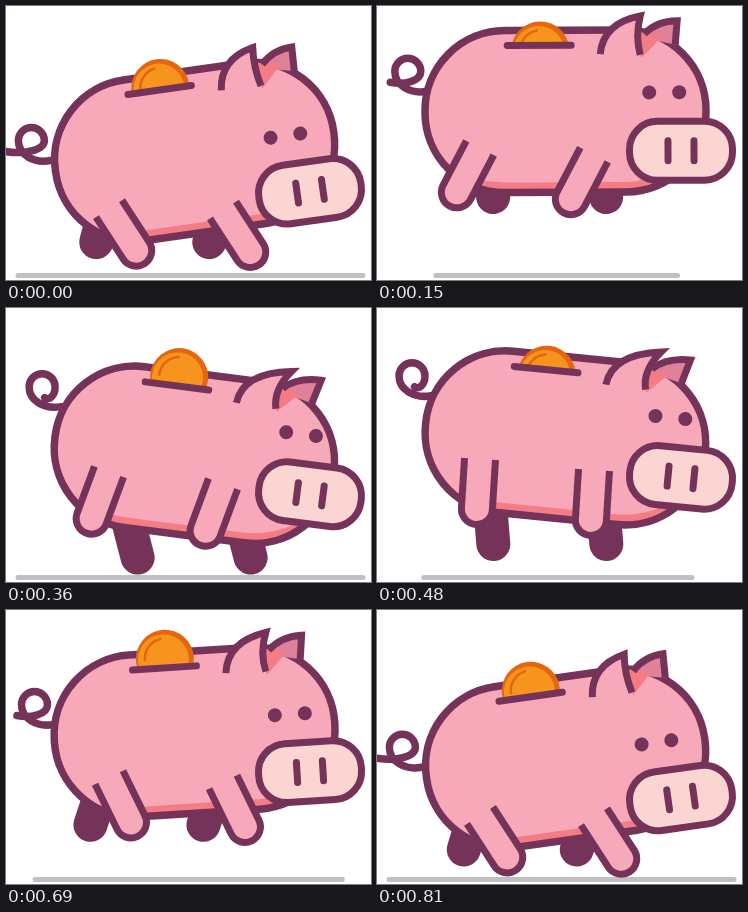
These frames come from a looping animation (365 by 274 pixels, 0.84 s). An HTML page with a canvas:

```html
<!DOCTYPE html>
<html lang="en">
<head>
<meta charset="utf-8">
<title>Running piggy bank</title>
<style>
  html, body { margin: 0; width: 100%; height: 100%; overflow: hidden; background: #fff; }
  canvas { display: block; }
</style>
</head>
<body>
<canvas id="stage" width="365" height="274"></canvas>
<script>
const ctx = document.getElementById('stage').getContext('2d');
const LOOP = 840, STEP = 30;
const PLUM = '#76335a', PINK = '#f7a8b9', SALMON = '#f47c84', ROSE = '#df8199', SNOUT = '#fbd5d1';
const ORANGE = '#f7941e', RUST = '#e5660f';
const { cos, sin, PI } = Math;

const smooth = u => {
  u = Math.min(1, Math.max(0, u));
  return u * u * (3 - 2 * u);
};

// Eases up to 1 at "top", holds until "hold", eases back to 0 at "end"
const pulse = (t, top, hold, end) => smooth(t / top) * smooth((end - t) / (end - hold));

// One gallop holds two bounces; the bounce runs at double angle
function pose(t) {
  const a = 2 * PI * t / LOOP;
  return {
    y: 125 + 22.5 * cos(2 * a + 0.5),
    tilt: -7.2 * cos(a + 0.26) - 1.1 * cos(3 * a),
    leg: -33 + 63 * pulse(t, 170, 210, 815),
    footX: 108 + 25 * cos(a - 2.36),
    footY: 96 + 9 * cos(a - 3.58) + 3.5 * cos(2 * a),
    ear: 79.5 + 7.5 * cos(a - 3.3),
    curl: -11 - 15 * cos(a),
    coin: -2 + 9 * sin(2 * a),
    shadow: 47 * pulse(t % (LOOP / 2), 90, 140, 360)
  };
}

function paint(path, fill, stroke, width = 7, cap = 'butt') {
  const shape = typeof path === 'string' ? new Path2D(path) : path;
  if (fill) { ctx.fillStyle = fill; ctx.fill(shape); }
  if (stroke) {
    ctx.strokeStyle = stroke;
    ctx.lineWidth = width;
    ctx.lineCap = cap;
    ctx.stroke(shape);
  }
}

function pill(x, y, w, h, r) {
  const p = new Path2D();
  p.roundRect(x, y, w, h, r);
  return p;
}

function dot(x, y, r) {
  const p = new Path2D();
  p.arc(x, y, r, 0, 2 * PI);
  return p;
}

function group(x, y, degrees, content) {
  ctx.save();
  ctx.translate(x, y);
  ctx.rotate(degrees * PI / 180);
  content();
  ctx.restore();
}

const bodyShape = pill(-140.5, -80, 281, 162, 80);

function drawBody() {
  paint(bodyShape, PINK);
  ctx.save();
  ctx.clip(bodyShape);
  paint('M-90 69Q-72 72 -50 72H60Q92 71 122 48V90H-90Z', SALMON);
  ctx.restore();
  paint(bodyShape, null, PLUM, 7.5);
}

function drawEars(p) {
  const back = `M79 -76Q92 -89 ${p.ear * 0.4 + 82} -89L110 -65`;
  paint(back + 'L92 -69Z', ROSE);
  paint('M68 -80L97 -73L76 -52Z', SALMON);
  paint(back, null, PLUM);
  paint(`M35 -56Q38 -87 ${p.ear} -94Q70 -74 75 -55`, PINK, PLUM);
}

function drawCoin(p) {
  ctx.save();
  ctx.beginPath();
  ctx.rect(-70, -140, 90, 75);
  ctx.clip();
  group(-25, -65 + p.coin, 0, () => {
    paint(dot(0, 0, 29), RUST);
    paint(dot(-1.5, 1, 25.5), ORANGE);
    paint('M-20 0A20 20 0 0 1 -3 -20', null, RUST, 2.5, 'round');
  });
  ctx.restore();
  paint('M-58 -65H6', null, PLUM, 7, 'round');
}

function drawFace() {
  paint(pill(-51.5, -29.5, 103, 59, 28), SNOUT, PLUM);
  paint('M-13 -10V10M13 -10V10', null, PLUM, 7, 'round');
  paint(dot(-31.5, -58.5, 7), PLUM);
  paint(dot(-1.5, -58.5, 7), PLUM);
}

function drawTail(p) {
  group(31 + 0.7 * p.tilt, p.y - 40 - 3.7 * p.tilt, 0, () =>
    paint(`M19 20C2 23 -13 14 -13 0A13 13 0 0 1 13 0C13 10 ${p.curl / 2 + 5} 14 ${p.curl} 11`,
      null, PLUM, 7.5, 'round'));
}

function draw(t) {
  const p = pose(t);
  ctx.fillStyle = '#fff';
  ctx.fillRect(0, 0, 365, 274);
  paint(`M${12 + p.shadow} 269.5H${357 - 1.21 * p.shadow}`, null, '#c0c0c0', 5, 'round');

  // Far legs
  for (const dx of [0, 113]) {
    const hip = 65 + 0.4 * p.footX + dx;
    paint(`M${hip} ${p.y + 50}L${p.footX + dx} ${p.y + p.footY}`, null, PLUM, 34, 'round');
  }
  drawTail(p);

  const inBody = part => group(188.5, p.y, p.tilt, () => part(p));
  inBody(drawBody);

  // Near legs
  const leg = 'M-15.5 0V50A15.5 15.5 0 0 0 15.5 50V0';
  group(103, p.y + 37 - 2.6 * p.tilt, p.leg, () => paint(leg, PINK, PLUM));
  group(217, p.y + 44 - 1.9 * p.tilt, p.leg, () => paint(leg, PINK, PLUM));

  inBody(drawEars);
  inBody(drawCoin);
  group(304, p.y + 40.5, p.tilt, drawFace);
}

function frame() {
  const t = performance.now() % LOOP;
  draw(Math.floor(t / STEP) * STEP);
  requestAnimationFrame(frame);
}
frame();
</script>
</body>
</html>
```
